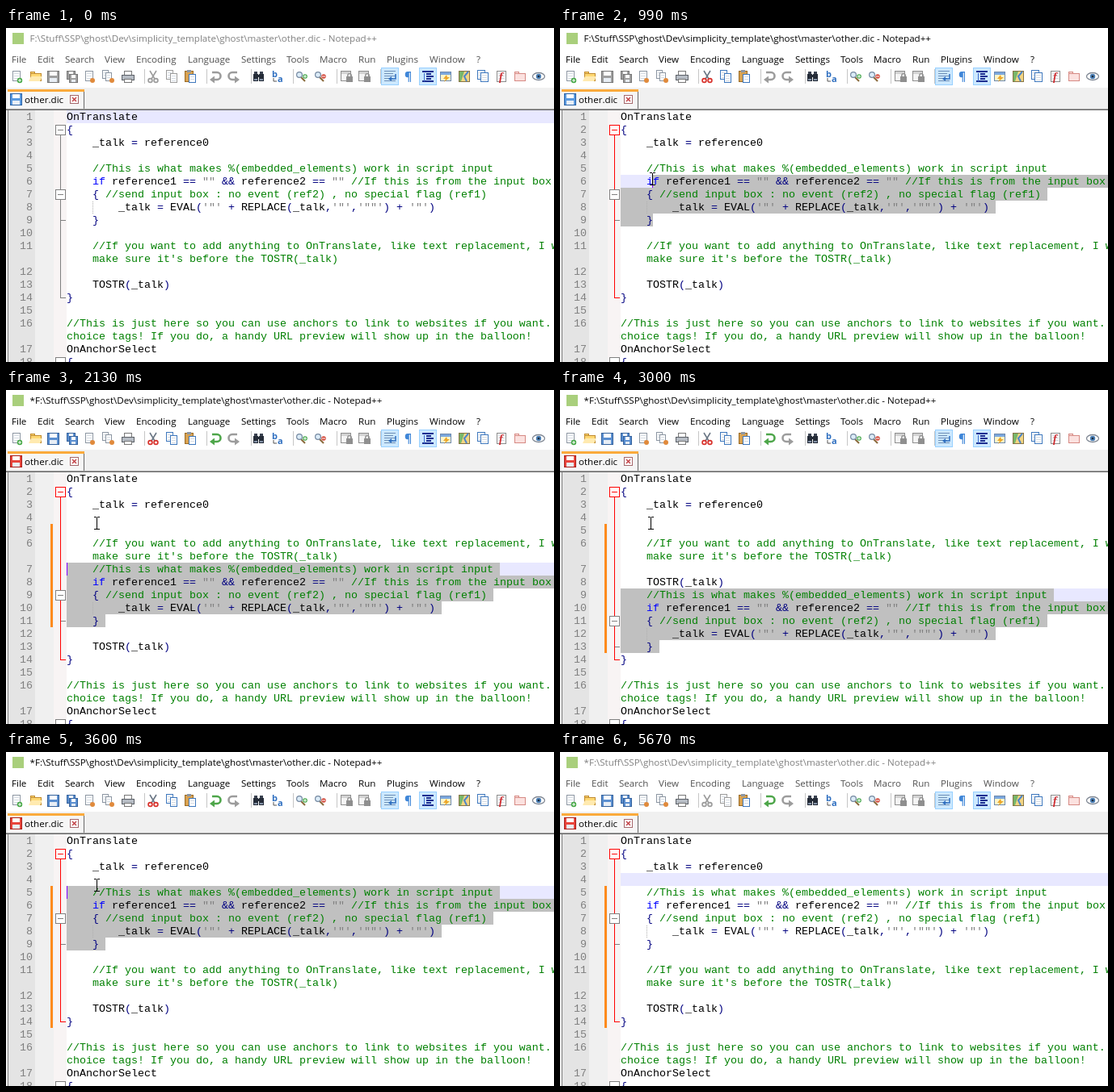
These frames come from a looping animation (678 px wide and 414 px high, 5.76 s). An HTML page with a canvas:

```html
<!DOCTYPE html>
<html lang="en">
<head>
<meta charset="utf-8">
<title>Moving lines in an editor</title>
<style>
html, body { margin: 0; width: 100%; height: 100%; overflow: hidden; background: #fff; }
canvas { display: block; }
</style>
</head>
<body>
<canvas id="stage" width="678" height="414"></canvas>
<script>
const W = 678, H = 414, LOOP = 5760, STEP = 30;
const ctx = document.getElementById('stage').getContext('2d');
const UI = '11.6px "Open Sans", "Noto Sans", sans-serif';
const MONO = '13.333px "Liberation Mono", "Courier New", monospace';
const LEFT = 75, TOP = 102, ROW = 16, COL = 8;

// Each entry is one numbered line, split into its wrapped rows.
const head = [['OnTranslate'], ['{'], ['    _talk = reference0'], ['']];
const block = [
  ['    //This is what makes %(embedded_elements) work in script input'],
  ['    if reference1 == "" && reference2 == "" //If this is from the input box '],
  ['    { //send input box : no event (ref2) , no special flag (ref1)'],
  ['        _talk = EVAL(\'"\' + REPLACE(_talk,\'"\',\'""\') + \'"\')'],
  ['    }']
];
const gap = [
  [''],
  ['    //If you want to add anything to OnTranslate, like text replacement, I would',
   "    make sure it's before the TOSTR(_talk)"],
  [''],
  ['    TOSTR(_talk)']
];
const tail = [
  ['}'], [''],
  ['//This is just here so you can use anchors to link to websites if you want. ',
   'choice tags! If you do, a handy URL preview will show up in the balloon!'],
  ['OnAnchorSelect'], ['{']
];
const gapRows = [0, 1, 3, 4, 5];
const moves = [[0, 0], [1980, 1], [2130, 2], [2310, 3], [2460, 4], [3240, 3], [3390, 2], [3600, 0]];
const CLICK = 690, RELEASE = 1200, EDIT = 1980, DESELECT = 5040, BLUR = 5670;
const caretOff = [[0, CLICK], [1260, 1800], [3000, 3240], [4170, 4710], [5580, LOOP]];
const path = [
  [60, 651, 72], [180, 560, 118], [330, 380, 178], [480, 230, 230], [600, 155, 247],
  [690, 118, 240], [870, 116, 214], [990, 114, 187], [1200, 109, 172], [1230, 112, 165],
  [4440, 112, 165], [4530, 235, 149], [4620, 430, 148], [4710, 560, 157], [4740, 572, 158],
  [5040, 572, 158], [5160, 622, 128], [5310, 651, 72]
];

function box(x, y, w, h, fill, stroke) {
  if (fill) { ctx.fillStyle = fill; ctx.fillRect(x, y, w, h); }
  if (stroke) {
    ctx.strokeStyle = stroke; ctx.lineWidth = 1;
    ctx.strokeRect(x + .5, y + .5, w - 1, h - 1);
  }
}
function line(color, width, ...p) {
  ctx.beginPath();
  for (let i = 0; i < p.length; i += 2) ctx.lineTo(p[i], p[i + 1]);
  ctx.strokeStyle = color; ctx.lineWidth = width; ctx.stroke();
}
function shape(fill, ...p) {
  ctx.beginPath();
  for (let i = 0; i < p.length; i += 2) ctx.lineTo(p[i], p[i + 1]);
  ctx.closePath(); ctx.fillStyle = fill; ctx.fill();
}
function disc(x, y, r, fill, stroke, width = 1) {
  ctx.beginPath(); ctx.arc(x, y, r, 0, 7);
  if (fill) { ctx.fillStyle = fill; ctx.fill(); }
  if (stroke) { ctx.strokeStyle = stroke; ctx.lineWidth = width; ctx.stroke(); }
}
function text(s, x, y, color, font = UI) {
  ctx.font = font; ctx.fillStyle = color; ctx.fillText(s, x, y);
}

// Toolbar pictures
function page(x, y, color = '#8c96a2', w = 10, h = 13) {
  box(x, y, w, h, '#fff', color);
  for (let i = 3; i < h - 2; i += 3) box(x + 2, y + i, w - 4, 1, '#d3dae2');
}
function floppy(x, y, s, main, dark) {
  box(x, y, s, s, main, dark);
  box(x + 3, y + 1, s - 6, Math.round(s * .35), '#fff');
  box(x + 3, y + s - Math.round(s * .4), s - 6, Math.round(s * .4) - 1, '#e8eef5');
}
function folder(x, y, fill, edge) {
  box(x, y, 6, 3, fill, edge);
  box(x, y + 2, 14, 10, fill, edge);
}
// A hook with its head at the bottom; dir 1 points left, -1 points right.
function turn(x, dir, color) {
  ctx.beginPath();
  ctx.arc(x + dir * 2, 59.5, 4.5, -Math.PI / 2, Math.PI / 2, dir < 0);
  ctx.lineTo(x - dir * 2, 64);
  ctx.moveTo(x + dir * 2, 55); ctx.lineTo(x - dir * 4, 55);
  ctx.strokeStyle = color; ctx.lineWidth = 2.6; ctx.stroke();
  shape(color, x - dir * 7, 64, x - dir, 59.5, x - dir, 68.5);
}
function lens(x, mark, plus) {
  line('#8a6a3c', 2, x - 1, 61, x + 4, 66);
  disc(x - 3, 58, 3.4, '#dcecf8', '#7488a0', 1.2);
  disc(x + 4, 60, 2.8, mark);
  line('#fff', 1, x + 2, 60, x + 6, 60);
  if (plus) line('#fff', 1, x + 4, 58, x + 4, 62);
}
function pressed(x) { box(x - 11, 49, 22, 22, '#cce8ff', '#99d1ff'); }
function rows(x, color, indent, h) {
  for (let i = 0; i < 5; i++) {
    const in1 = i > 0 && i < 4 ? indent : 0;
    box(x - 7 + in1, 53 + i * 3, 14 - in1 - (i % 2) * 3, h, color);
  }
}

function toolbar(s) {
  const off = '#9c9c9c', offFill = '#d2d2d2';
  const save = s.dirty ? ['#5b8fd0', '#34619c'] : ['#a0a0a0', '#757575'];
  for (const x of [171, 248, 303, 355, 409, 463]) box(x, 51, 1, 18, '#c6c6c6');

  page(8, 53); disc(17, 65, 3.2, '#45a845');
  line('#fff', 1, 15, 65, 19, 65); line('#fff', 1, 17, 63, 17, 67);
  folder(30, 54, '#ffd873', '#c08a2e'); shape('#ffeab0', 31, 60, 45, 60, 42, 66, 28, 66);
  floppy(51, 53, 15, ...save);
  floppy(75, 53, 11, ...save); floppy(78, 57, 11, ...save);
  page(98, 53); disc(107, 65, 3, '#e08a3c');
  page(119, 52, '#8c96a2', 8, 11); page(123, 55, '#8c96a2', 8, 11); disc(131, 65, 3, '#e08a3c');
  box(146, 53, 10, 6, '#fff', '#777'); box(143, 58, 16, 7, '#b6bcc4', '#5c6168');
  box(146, 63, 10, 5, '#fff', '#777');

  const blade = s.selected ? '#6c7886' : off, grip = s.selected ? '#d8322c' : off;
  line(blade, 1.6, 178, 53, 184, 63); line(blade, 1.6, 186, 53, 180, 63);
  disc(178.5, 65, 2.4, null, grip, 1.7); disc(185.5, 65, 2.4, null, grip, 1.7);
  const copy = s.selected ? '#3f78bd' : off;
  page(198, 52, copy, 9, 12); page(203, 56, copy, 9, 12);
  box(221, 53, 11, 14, '#d9a250', '#9a6a25'); box(224, 52, 5, 3, '#8d97a3');
  page(226, 57, '#3f78bd', 9, 11);

  turn(259, 1, s.dirty ? '#4ea64a' : off);
  turn(282, -1, off);

  for (const x of [306, 313]) {
    box(x + 1, 54, 4, 4, '#3a4250'); box(x, 57, 6, 9, '#252c38'); box(x + 1, 63, 4, 2, '#8593a8');
  }
  box(311, 58, 3, 3, '#252c38');
  text('b', 329, 61, '#2f6fc0', 'bold 11px "Open Sans", sans-serif');
  text('a', 336, 67, '#2f6fc0', 'bold 11px "Open Sans", sans-serif');
  line('#555', 1, 331, 62, 331, 66, 335, 66);
  lens(366, '#3fa547', true); lens(389, '#d34b3d', false);

  for (const x of [421, 443]) {
    box(x - 7, 53, 13, 13, '#f4f4f4', '#8f8f8f'); box(x - 6, 54, 11, 3, offFill);
    box(x, 60, 8, 7, '#8f8f8f'); disc(x + 4, 59, 2.3, null, '#8f8f8f', 1.3);
  }

  pressed(475); rows(475, '#6f8fb5', 0, 1);
  line('#2f6fc0', 1.5, 482, 57, 482, 63, 476, 63); shape('#2f6fc0', 473, 63, 477, 60, 477, 66);
  text('¶', 493, 65, '#3f86d8', 'bold 14px "Open Sans", sans-serif');
  pressed(522); rows(522, '#1d2f91', 5, 2); line('#3f6fd0', 1, 517.5, 56, 517.5, 66);
  box(537, 54, 14, 12, '#fff5c9', '#6d89ad'); box(538, 55, 12, 3, '#7ba7dd');
  shape('#eda82a', 545, 58, 541, 63, 544, 63, 542, 67, 549, 61, 546, 61);
  box(560, 53, 14, 14, '#f3d583', '#877444'); shape('#78b66a', 561, 54, 567, 54, 563, 66, 561, 66);
  line('#4e86c9', 2, 572, 54, 567, 60, 570, 66);
  page(583, 52, '#3f78bd', 10, 12); page(587, 55, '#3f78bd', 10, 12);
  page(607, 53, '#8b8b8b', 12, 14);
  text('f', 610, 65, '#cf2c30', 'italic bold 14px "Liberation Serif", serif');
  folder(629, 54, '#fbe1df', '#d68a84');
  ctx.beginPath(); ctx.ellipse(659, 60, 7.5, 4.5, 0, 0, 7);
  ctx.fillStyle = '#fff'; ctx.fill(); ctx.strokeStyle = '#808894'; ctx.lineWidth = 1.3; ctx.stroke();
  disc(659, 60, 3.2, '#4b7fb5'); disc(659, 60, 1.3, '#1c2b3d');
}

const menu = [['File', 7], ['Edit', 39], ['Search', 73], ['View', 122], ['Encoding', 161],
  ['Language', 225], ['Settings', 291], ['Tools', 347], ['Macro', 388], ['Run', 436],
  ['Plugins', 471], ['Window', 524], ['?', 582]];

function chrome(s) {
  box(0, 0, W, 74, '#fff');
  box(8, 6, 14, 14, '#a9cf7c');
  text((s.dirty ? '*' : '') + 'F:\\Stuff\\SSP\\ghost\\Dev\\simplicity_template\\ghost\\master\\other.dic - Notepad++',
    29.5, 17, s.focus ? '#000' : '#808080');
  for (const [name, x] of menu) text(name, x, 43, s.focus ? '#000' : '#505050');
  toolbar(s);

  box(0, 74, W, 28, '#f0f0f0');
  box(2, 76, 95, 25, '#f6f6f6');
  box(96, 76, 1, 25, '#696969');
  box(2, 76, 95, 3, '#faaa3c');
  floppy(5, 81, 15, ...(s.dirty ? ['#e8453c', '#a81f1a'] : ['#5b9be0', '#2a62a6']));
  text('other.dic', 23, 93, '#000');
  box(79, 83, 11, 11, '#fff', '#a4686c');
  line('#c4484c', 1.6, 82, 86, 87, 91); line('#c4484c', 1.6, 87, 86, 82, 91);
  box(0, 100, W, 1, '#a0a0a0'); box(0, 101, W, 1, '#696969');
}

const token = /\/\/.*|'[^']*'|"[^"]*"|\bif\b|[(){}=+&,]+|[^\s(){}=+&,'"]+/g;
function codeRow(s, y, comment) {
  if (comment) {
    const indent = s.search(/\S/);
    text(s.slice(indent), LEFT + indent * COL, y, '#008000', MONO);
    return;
  }
  for (const m of s.matchAll(token)) {
    const w = m[0];
    let color = '#000';
    if (w.startsWith('//')) color = '#008000';
    else if (/^['"]/.test(w)) color = '#808080';
    else if (w === 'if') color = '#0000ff';
    else if (/^[(){}=+&,]/.test(w)) color = '#000080';
    text(w, LEFT + m.index * COL, y, color, MONO);
  }
}

function foldBox(y, color) {
  box(61, y + 2, 13, 13, '#fff', color);
  box(64, y + 8, 7, 1, color);
}

function editor(s) {
  const lines = [...head, ...gap.slice(0, s.n), ...block, ...gap.slice(s.n), ...tail];
  const flat = lines.flat();
  const y0 = TOP + (4 + gapRows[s.n]) * ROW;

  box(0, TOP, W, H - TOP, '#fff');
  box(0, TOP, 3, H - TOP, '#f0f0f0'); box(2, TOP, 1, H - TOP, '#808080');
  box(3, TOP, 33, H - TOP, '#e4e4e4');
  box(36, TOP, 23, H - TOP, '#f0f0f0');
  box(59, TOP, 16, H - TOP, '#f8f4f4');

  box(LEFT, TOP + s.row * ROW, W - LEFT, ROW, '#e8e8ff');
  if (s.selected) {
    for (let r = s.row; r <= s.endRow; r++) {
      const a = r === s.row ? s.col : 0;
      const b = r === s.endRow ? s.endCol : flat[r].length + 1;
      box(LEFT + a * COL, TOP + r * ROW, (b - a) * COL, ROW, '#c0c0c0');
    }
  }

  if (s.barEnd) box(55, 166, 3, s.barEnd - 166, '#ff8a1c');

  const grey = '#808080', red = '#ff0000';
  const inner = s.row >= 6 && s.row <= 8 && s.dragging;
  const outer = s.clicked && !inner ? red : grey;
  box(67, 132, 1, 203, outer); box(67, 334, 7, 1, outer);
  if (inner) box(67, y0 + 44, 1, 29, red);
  box(68, y0 + 72, 6, 1, inner ? red : grey);
  foldBox(118, outer); foldBox(y0 + 32, inner ? red : grey); foldBox(406, grey);

  for (let y = y0 + 49; y < y0 + 64; y += 2) box(LEFT + 32, y, 1, 1, '#b0b0b0');

  let y = TOP;
  lines.forEach((parts, i) => {
    const num = String(i + 1);
    text(num, 33 - num.length * COL, y + 12, '#808080', MONO);
    const comment = parts[0].trim().startsWith('//');
    for (const p of parts) { codeRow(p, y + 12, comment); y += ROW; }
  });

  if (s.caret) box(LEFT + s.col * COL - (s.col ? 1 : 0), TOP + s.row * ROW, 1, ROW, '#8000ff');
}

function mouseAt(t) {
  let i = 1;
  while (i < path.length - 1 && path[i][0] < t) i++;
  const [t0, x0, y0] = path[i - 1], [t1, x1, y1] = path[i];
  const k = Math.min(1, Math.max(0, (t - t0) / (t1 - t0)));
  return [Math.round(x0 + (x1 - x0) * k), Math.round(y0 + (y1 - y0) * k)];
}

function pointer(x, y) {
  if (y < TOP) {
    ctx.save(); ctx.translate(x, y);
    shape('#fff', 0, 0, 0, 16, 4, 12.5, 6.5, 18, 9, 17, 6.5, 11.5, 11, 11);
    line('#000', 1, 0, 0, 0, 16, 4, 12.5, 6.5, 18, 9, 17, 6.5, 11.5, 11, 11, 0, 0);
    ctx.restore();
    return;
  }
  box(x, y - 7, 1, 15, '#000');
  for (const e of [y - 8, y + 7]) { box(x - 3, e, 3, 1, '#000'); box(x + 1, e, 3, 1, '#000'); }
}

function stateAt(t) {
  const n = moves.filter(m => m[0] <= t).pop()[1];
  const s = {
    n, dirty: t >= EDIT, clicked: t >= CLICK, focus: t >= CLICK && t < BLUR,
    selected: t >= CLICK && t < DESELECT, dragging: t >= CLICK && t < EDIT,
    caret: !caretOff.some(([a, b]) => t >= a && t < b),
    row: 0, col: 0, endRow: 8, endCol: 5, barEnd: 0
  };
  if (s.dragging) {
    const [x, y] = mouseAt(Math.min(t, RELEASE));
    s.row = Math.max(4, Math.min(8, Math.floor((y - TOP) / ROW)));
    s.col = Math.min(block[s.row - 4][0].length, Math.round((x - LEFT) / COL));
  } else if (s.selected) {
    s.row = 4 + gapRows[n];
    s.endRow = s.row + 4;
    s.endCol = 6;
  } else if (t >= DESELECT) s.row = 3;
  if (s.dirty) s.barEnd = t >= 3240 ? 342 : TOP + (s.endRow + 1) * ROW;
  return s;
}

function draw(now) {
  const t = Math.floor((now % LOOP) / STEP) * STEP;
  const s = stateAt(t);
  editor(s);
  chrome(s);
  if (t >= path[0][0] && t < 5310) pointer(...mouseAt(t));
}

const start = performance.now();
function tick() {
  draw(performance.now() - start);
  requestAnimationFrame(tick);
}
tick();
</script>
</body>
</html>
```
